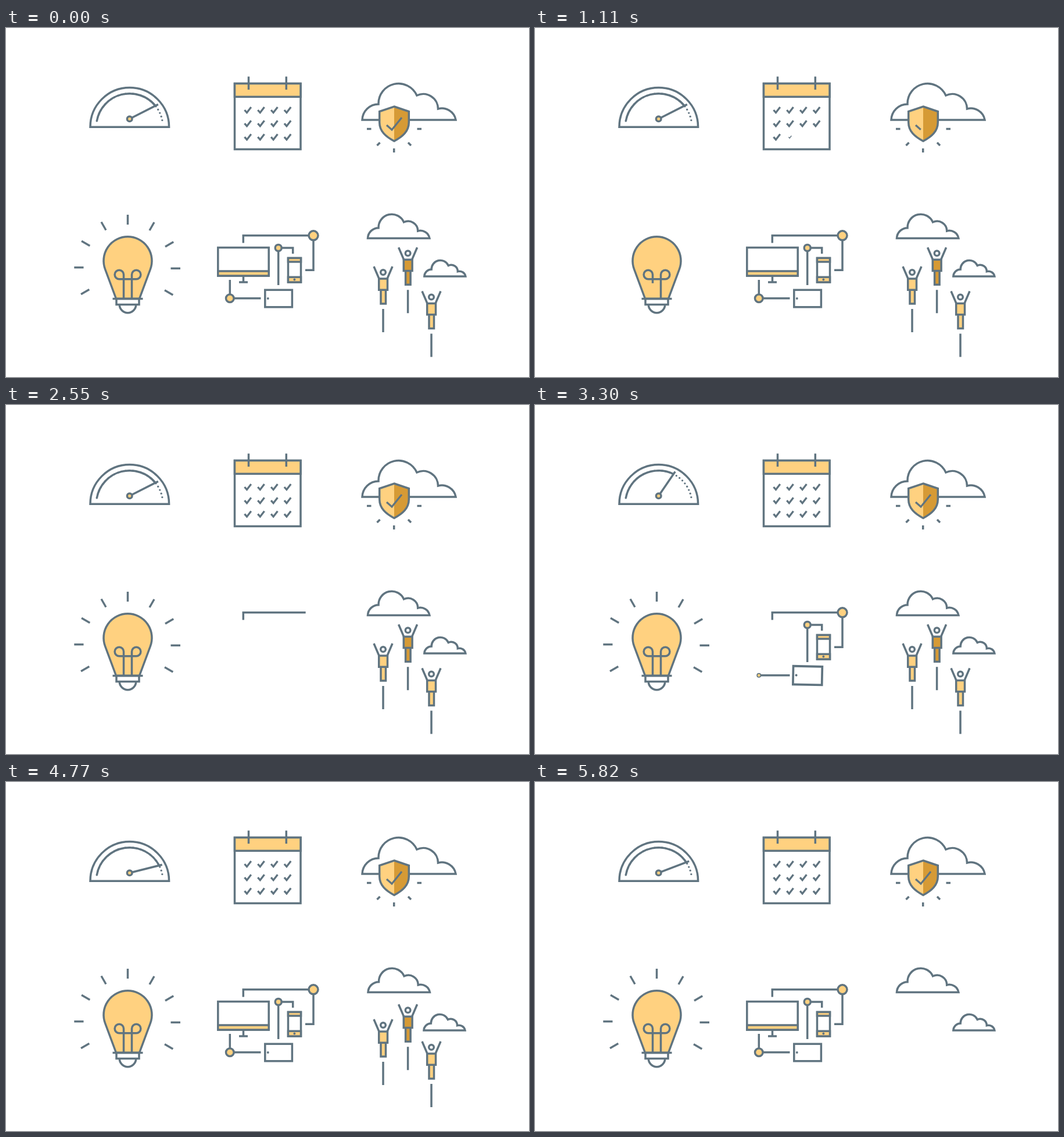
An HTML page for the animation above (7.05 s loop, 900 by 600 pixels).

```html
<!DOCTYPE html>
<html lang="en">
<head>
<meta charset="utf-8">
<title>Icon set</title>
<style>
  html, body { margin: 0; width: 100%; height: 100%; overflow: hidden; background: #fff; }
  svg { display: block; width: 900px; height: 600px; fill: none; stroke: #607480; stroke-width: 3.5; }
  .white { fill: #fff; }
  .gold { fill: #ffd180; }
  .amber { fill: #d69a35; }
  .dot { fill: #607480; stroke: none; }
  .flat { stroke: none; }
  #cloud { vector-effect: non-scaling-stroke; }
</style>
</head>
<body>
<svg viewBox="0 0 900 600">
  <defs>
    <path id="cloud" class="white" d="M613 158A28 28 0 0 1 641 131A34.5 34.5 0 0 1 707 116A25.5 25.5 0 0 1 743.5 139A24.5 24.5 0 0 1 774 158Z"/>
    <g id="runner">
      <path d="M633 410L642 431M665 410L656 431M649 483V523"/>
      <circle class="white" cx="649" cy="420" r="4.3"/>
      <path d="M641.7 431H656.5V450.3H641.7ZM645 450.3H653.5V474H645Z"/>
    </g>
    <clipPath id="cell"><rect x="600" y="300" width="300" height="300"/></clipPath>
  </defs>

  <g id="gauge">
    <path d="M145 170.3A67.8 67.8 0 0 1 280.6 170.3Z"/>
    <g id="dots"></g>
    <path id="arc"/>
    <path id="needle"/>
    <circle class="gold" cx="212.7" cy="156.2" r="4.3"/>
  </g>

  <g id="calendar">
    <rect class="white" x="393.5" y="95.5" width="113.5" height="113"/>
    <rect class="gold" x="393.5" y="95.5" width="113.5" height="22.8"/>
    <path d="M417.5 83.5V106M482.3 83.5V106"/>
    <g id="checks"></g>
  </g>

  <g id="secure">
    <use href="#cloud"/>
    <g id="shieldRays"></g>
    <g id="shield">
      <path class="gold flat" d="M668 135L642.7 143.5V162C642.7 178 654 187 668 194.5Z"/>
      <path class="amber flat" d="M668 135L693.3 143.5V162C693.3 178 682 187 668 194.5Z"/>
      <path d="M668 135L693.3 143.5V162C693.3 178 682 187 668 194.5C654 187 642.7 178 642.7 162V143.5Z"/>
    </g>
    <path id="tick" pathLength="1" stroke-width="3.2" d="M655 167L664 175L681 154"/>
  </g>

  <g id="bulb">
    <path class="gold" d="M189.5 465.5L170.7 415A41.5 41.5 0 1 1 248.3 415L229.5 465.5Z"/>
    <path id="filament" pathLength="1" d="M216.5 465V424A7.7 7.7 0 1 1 224.2 431.7H194.8A7.7 7.7 0 1 1 202.5 424V465"/>
    <path class="white" d="M195.3 475.5A14.2 14.2 0 0 0 223.7 475.5"/>
    <rect class="white" x="190" y="465.5" width="39" height="10"/>
    <path d="M183.5 465.5H235.5"/>
    <g id="bulbRays"></g>
  </g>

  <g id="devices">
    <g id="links"></g>
    <g id="nodes"></g>
    <g id="monitor">
      <rect class="white" x="364.8" y="377.5" width="87.4" height="48.5"/>
      <rect class="gold" x="364.8" y="418" width="87.4" height="8"/>
      <path d="M408.5 426V437M401 437H416"/>
    </g>
    <g id="phone">
      <rect class="white" x="485.5" y="395.5" width="22" height="41.5"/>
      <path class="gold" d="M485.5 395.5H507.5V402H485.5ZM485.5 428.3H507.5V437H485.5Z"/>
      <circle class="dot" cx="496.4" cy="432.6" r="2"/>
    </g>
    <g id="tablet">
      <rect class="white" x="445.8" y="450.3" width="46.6" height="29.5"/>
      <circle class="dot" cx="450.8" cy="465" r="1.9"/>
    </g>
  </g>

  <g id="team" clip-path="url(#cell)">
    <use class="gold" href="#runner"/>
    <use class="amber" href="#runner"/>
    <use class="gold" href="#runner"/>
    <use id="bigCloud" href="#cloud"/>
    <use id="smallCloud" href="#cloud"/>
  </g>
</svg>

<script>
const LOOP = 7050, STEP = 30, HOLD = 5700;
const $ = id => document.getElementById(id);

function add(parent, tag, attrs) {
  const el = document.createElementNS('http://www.w3.org/2000/svg', tag);
  for (const k in attrs) el.setAttribute(k, attrs[k]);
  return $(parent).appendChild(el);
}
const addPath = (parent, d) => add(parent, 'path', { d, pathLength: 1 });

// timing helpers
const ramp = (t, start, length) => Math.min(1, Math.max(0, (t - start) / length));
const sine = u => (1 - Math.cos(Math.PI * u)) / 2;
const hump = (t, start, length) => Math.sin(Math.PI * ramp(t, start, length));
const backIn = u => u * u * (3.4 * u - 2.4);
const backOut = u => 1 - backIn(1 - u);

function trim(el, p) {
  el.setAttribute('visibility', p > 0 ? 'visible' : 'hidden');
  el.setAttribute('stroke-dasharray', p < 1 ? p + ' 2' : 'none');
}
function pose(el, x, y, scale, angle = 0) {
  el.setAttribute('transform',
    `translate(${x} ${y}) rotate(${angle}) scale(${Math.max(0, scale)}) translate(${-x} ${-y})`);
}
const move = (el, x, y, s = 1) => el.setAttribute('transform', `translate(${x} ${y}) scale(${s})`);

// gauge
const polar = (r, deg) => {
  const a = deg * Math.PI / 180;
  return [212.7 + r * Math.cos(a), 170 - r * Math.sin(a)];
};
for (let i = 0; i < 25; i++) {
  const [cx, cy] = polar(57.3, 11.5 + i * 6.6);
  add('dots', 'circle', { class: 'dot', cx, cy, r: 1.65 });
}

// calendar
const checks = Array.from({ length: 12 }, (_, i) => {
  const x = 416 + (i % 4) * 22.8, y = 141 + (i >> 2) * 23.2;
  const el = add('checks', 'path', { d: `M${x - 5.5} ${y}l4 4.5l7.3 -9.5`, 'stroke-width': 3.3 });
  return { el, x, y };
});

const shieldRays = ['M628.5 173.5H621', 'M643.5 197L638.5 202', 'M667.7 207V214',
  'M692 197L697 202', 'M707.5 173.5H715'].map(d => addPath('shieldRays', d));

const bulbRays = ['M209.5 338V321', 'M172 347.5L164 333.5', 'M144.3 374.5L130 366.3',
  'M133.5 411.7H117.3', 'M143.3 449.5L129 457.8', 'M247 348L255 334', 'M274 376L288.2 367.8',
  'M283.5 413.3H300', 'M273 450.8L287.3 459'].map(d => addPath('bulbRays', d));

// devices: path, time it draws in, duration
const links = [
  ['M408.3 369.5V356.8H529', 2370, 200],
  ['M529 356.8V416.2H515', 2600, 130],
  ['M493.7 388V378H468.7', 2850, 90],
  ['M468.7 378V442', 2940, 120],
  ['M438.5 464.8H385.3', 3210, 90],
  ['M385.3 464.8V433', 3330, 100]
].map(([d, on, time]) => ({ el: addPath('links', d), on, time }));

const node = (cx, cy, r) => add('nodes', 'circle', { class: 'gold', cx, cy, r });
// element, centre, exit time, entry time, spin out, spin in
const pops = [
  [node(529, 356.8, 8), 529, 356.8, 1620, 2550, 0, 0],
  [node(468.7, 378, 5.5), 468.7, 378, 1500, 2910, 0, 0],
  [node(385.3, 464.8, 6.8), 385.3, 464.8, 1620, 3270, 0, 0],
  [$('phone'), 496.5, 416.2, 1710, 2760, 60, -40],
  [$('tablet'), 469, 465, 1770, 3060, -30, 30],
  [$('monitor'), 408.5, 406, 1800, 3500, 0, 0]
];

// runners: element, x, y, bob height, take-off time
const [one, two, three] = document.querySelectorAll('#team use');
const runners = [[one, 0, 0, -2, 5280], [two, 42.6, -32.7, 5, 5200], [three, 83, 42.5, -6.5, 5240]];

function drawGauge(t) {
  let angle = 38.2;
  if (t >= 4320) angle = 29.65 + 3.25 * Math.cos(2 * Math.PI * (t - HOLD) / 620);
  else if (t >= 3750) angle = 169 - 139 * sine(ramp(t, 3750, 570));
  else if (t >= 3120) angle += 130.8 * sine(ramp(t, 3120, 630));
  $('arc').setAttribute('d', `M${polar(57.3, 170)}A57.3 57.3 0 0 1 ${polar(57.3, Math.min(angle, 169.5))}`);
  $('needle').setAttribute('d', `M212.7 156.2L${polar(62.5, angle)}`);
}

function drawChecks(t) {
  checks.forEach(({ el, x, y }, i) => {
    const u = ramp(t, 270 + i * 90, 120);
    pose(el, x, y, t < 240 ? 1 - ramp(t, 0, 210) : u * (2 - u));
  });
}

function drawShield(t) {
  pose($('shield'), 668, 165, 1 + 0.2 * hump(t, 1230, 330) + 0.14 * hump(t, 1560, 440)
    + 0.05 * hump(t, 2000, 360));
  trim($('tick'), t < 1000 ? 1 - ramp(t, 780, 150) : ramp(t, 1050, 200));
  const p = t < 1500 ? 1 - ramp(t, 1200, 150) : ramp(t, 1755, 195);
  shieldRays.forEach(el => trim(el, p));
}

function drawBulb(t) {
  trim($('filament'), t < 600 ? 1 - ramp(t, 120, 400) : ramp(t, 660, 525));
  const p = t < 600 ? 1 - ramp(t, 0, 210) : sine(ramp(t, 1185, 225));
  bulbRays.forEach(el => trim(el, p));
}

function drawDevices(t) {
  for (const { el, on, time } of links)
    trim(el, t < 2200 ? 1 - ramp(t, 1440, 150) : ramp(t, on, time));
  for (const [el, x, y, off, on, spinOut, spinIn] of pops) {
    const out = ramp(t, off, 300), back = ramp(t, on, 300);
    if (t < 2200) pose(el, x, y, 1 - backIn(out), spinOut * out);
    else pose(el, x, y, backOut(back), spinIn * (1 - back) ** 2);
  }
}

function drawTeam(t) {
  for (const [el, x, y, bob, go] of runners) {
    const u = ramp(t, go, 380);
    move(el, x, y + bob * hump(t, 4350, 800) + 2 * hump(t, go - 110, 220) - 290 * u ** 3);
    el.setAttribute('visibility', u < 1 ? 'visible' : 'hidden');
  }
  const drift = hump(t, 4350, 1300);
  move($('bigCloud'), 217.3 + 0.6 * drift, 257.1, 0.661);
  move($('smallCloud'), 449.5 - drift, 357.3, 0.441);
}

function frame() {
  const clock = performance.now() % LOOP;
  const t = Math.min(HOLD, Math.floor(clock / STEP) * STEP);
  [drawGauge, drawChecks, drawShield, drawBulb, drawDevices, drawTeam].forEach(draw => draw(t));
  requestAnimationFrame(frame);
}
frame();
</script>
</body>
</html>
```
